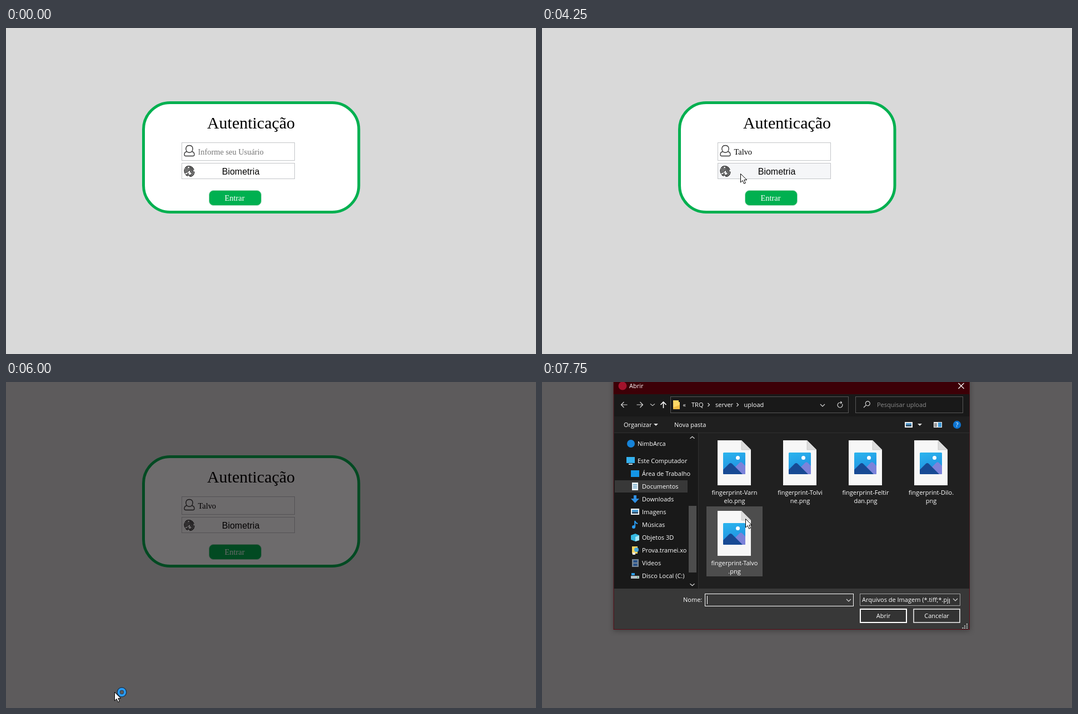
Write an HTML page that moves like this. It is 954 by 587 pixels and loops after 8000 ms.

```html
<!DOCTYPE html>
<html lang="pt-BR">
<head>
<meta charset="utf-8">
<title>Autenticação</title>
<style>
html, body { margin: 0; width: 100%; height: 100%; overflow: hidden; background: #d9d9d9; }
svg { display: block; width: 954px; height: 587px; }
.serif { font: 14.4px "Liberation Serif", serif; }
.arial { font: 16px "Liberation Sans", sans-serif; }
.lato { font: 11.6px Lato, sans-serif; }
.ui { font: 11px "Open Sans", sans-serif; fill: #fff; }
.mid { text-anchor: middle; }
.line { fill: none; stroke: #d6d6d6; stroke-width: 1.2; }
.drop { filter: drop-shadow(0 1px 2px rgba(0, 0, 0, .5)); }
text { white-space: pre; }
</style>
</head>
<body>
<svg id="stage" viewBox="0 0 954 587" xmlns="http://www.w3.org/2000/svg"></svg>
<script>
const LOOP = 8000, STEP = 250;
const NAME = 'Talvo', EMAIL = 'talvo.bremin37@zulteia.com';

const rect = (x, y, w, h, fill, more = '') =>
  `<rect x="${x}" y="${y}" width="${w}" height="${h}" fill="${fill}" ${more}/>`;
const box = (x, y, w, h, fill, stroke, more = '') =>
  rect(x + .5, y + .5, w - 1, h - 1, fill, `stroke="${stroke}" ${more}`);
const dot = (x, y, r, fill, more = '') => `<circle cx="${x}" cy="${y}" r="${r}" fill="${fill}" ${more}/>`;
const path = (d, more = 'class="line"') => `<path d="${d}" ${more}/>`;
const text = (x, y, str, cls = 'ui', more = '') => `<text x="${x}" y="${y}" class="${cls}" ${more}>${str}</text>`;
const during = (spans, body) => `<g data-on="${spans}">${body}</g>`;
const chevron = (x, y, s = 1) => path(`M${x - 4} ${y - 2 * s}l4 ${4 * s}l4 ${-4 * s}`);
const triangle = (x, y) => path(`M${x - 4} ${y - 2}h8l-4 4z`, 'fill="#ddd"');

function fingerprint() {
  const rings = [[2.2, '9 5'], [4.5, '20 4 3 2'], [6.8, '12 2 26 3'], [9, '30 3 14 3 5 2']];
  return rings.map(([r, dash]) =>
    `<ellipse cx="330" cy="258" rx="${r * .94}" ry="${r * 1.06}" fill="none" stroke="#222" stroke-width="1.5"
      stroke-dasharray="${dash}" transform="rotate(150 330 258)"/>`).join('');
}

function loginCard() {
  return rect(247.5, 134.5, 387.5, 197, '#fff', 'rx="48" stroke="#00b050" stroke-width="5"') +
    text(441, 181, 'Autenticação', 'serif mid', 'style="font-size:30px"') +
    box(316, 206, 204, 33, '#fff', '#c3c5c8') +
    path('M325.5 222.500C322.500 218 323.500 211.500 330 211.500S337.500 218 334.500 222.500C337 223 339 224.500 339 228Q339 230.500 336.500 230.500H323.500Q321 230.500 321 228C321 224.500 323 223 325.500 222.500Q330 226 334.500 222.500',
      'fill="none" stroke="#333" stroke-width="1.3"') +
    text(345.5, 227.5, '', 'serif', 'id="user"') +
    `<rect id="caret" y="213" width="1" height="18"/>` +
    box(316, 243, 204, 29, '#fff', '#c3c5c8', 'id="biometry"') +
    fingerprint() + text(422.5, 264, 'Biometria', 'arial mid') +
    box(365, 292, 95, 28, '#00b050', '#a5d9bb', 'rx="8"') +
    text(411.5, 311, 'Entrar', 'serif mid', 'fill="#fff"');
}

function suggestions(spans, items) {
  const rows = items.map((s, i) => text(327, 268.5 + i * 34.5, s, 'lato')).join('');
  return during(spans, rect(315.500, 240, 204.500, 15 + items.length * 34.5, '#fff', 'rx="3" class="drop"') + rows);
}

function filePanel() {
  return box(-2, 331, 275, 260, '#25171e', '#6e1f3a') +
    dot(203, 357.5, 6.3, 'none', 'class="line"') +
    dot(200.8, 356, .9, '#ddd') + dot(205.2, 356, .9, '#ddd') + path('M199.5 359.5q3.500 3.500 7 0') +
    rect(222.500, 350, 1, 15, '#5c4751') +
    [238, 242.5, 247].map(x => dot(x, 358, 1, '#ddd')).join('') +
    dot(-14, 442, 55, '#e9fff6') + rect(85, 384, 15, 6, '#5b5056') +
    rect(152, 405, 64, 64, '#000') +
    text(40, 512, 'rabisc.png', 'lato mid', 'fill="#fff" style="font-size:10px"') +
    text(184, 512, 'Logo.png', 'lato mid', 'fill="#fff" style="font-size:10px"') +
    rect(0, 539, 250, 1, '#5a4550') +
    box(-5, 554, 255, 27, '#3b2630', '#6b4857', 'rx="3" id="showAll"') +
    text(105, 571.5, 'Mostrar todos os arquivos', 'lato', 'fill="#fff" text-anchor="end"');
}

function imageFile(x, y, top, bottom) {
  const icon = path('M0 0h43l17 17v64h-60z', 'fill="#f7f7f7"') +
    path('M43 0v17h17z', 'fill="#dcdcdc" stroke="#bbb" stroke-width=".6"') +
    rect(10, 22, 40, 39, 'url(#sky)', 'rx="1.500"') +
    path('M29 51L40 40Q42 38.500 44 40L50 46V59.500Q50 61 48.500 61H38z', 'fill="#7c83da"') +
    path('M10 53L21 42Q23.500 40 26 42L45 61H11.500Q10 61 10 59.500z', 'fill="#174a94"') +
    dot(36.5, 31.5, 3.5, '#fff');
  return `<g transform="translate(${x} ${y})">${icon}${text(30.5, 98, top, 'ui mid')}${text(30.5, 113, bottom, 'ui mid')}</g>`;
}

function sidebarStart() {
  const items = ['Área de Traba', 'Downloads', 'Documentos', 'Vídeos', 'Imagens', 'Jogos Salvos', 'TRQ', 'server', 'FVEL - 6º Semes', 'upload'];
  return text(172, 123, 'Acesso rápido') + items.map((s, i) => {
    const y = 142 + i * 23;
    const pin = path(`M251 ${y + 4}l3-3M252 ${y - 1}l5 5M253.500 ${y - .5}l3-3l2 2l-3 3z`, 'fill="#9db0bd" stroke="#9db0bd" stroke-width="1.3"');
    return path(`M162 ${y - 7}h8l3 3v11h-11z`, 'fill="#fff"') + path(`M170 ${y - 7}v3h3z`, 'fill="#aaa"') +
      text(180, y + 4, s) + (i < 6 ? pin : '');
  }).join('') + rect(264, 108, 14, 188, '#4d4d4d');
}

function sidebarScrolled() {
  const screen = (x, y) => rect(x, y - 6, 15, 11, '#35b1ee');
  const sheet = y => rect(162, y - 7, 11, 14, '#e9f2f7') +
    [-4, -1, 2].map(d => rect(164, y + d, 7, 1.3, '#5597bd')).join('');
  const picture = y => rect(160, y - 6, 15, 11, '#f2f2f2') + rect(162, y - 4, 11, 7, '#4a9bd4') + rect(162, y, 11, 3, '#33506a');
  const items = [
    ['Área de Trabalho', y => rect(160, y - 6, 15, 12, '#1496e6')],
    ['Documentos', sheet],
    ['Downloads', y => path(`M165 ${y - 7}h5v6h5l-7.500 8l-7.500-8h5z`, 'fill="#2f8fe3"')],
    ['Imagens', picture],
    ['Músicas', y => dot(165, y + 4, 3, '#2a9bf0') + path(`M167.200 ${y + 4}v-11q1 4 5 5`, 'fill="none" stroke="#2a9bf0" stroke-width="2"')],
    ['Objetos 3D', y => path(`M160 ${y - 4}l8-3l7 3v9l-7 2l-8-3z`, 'fill="#35b9e2"') + path(`M168 ${y - 1}l7-3v9l-7 2z`, 'fill="#a5e6f5"')],
    ['Prova.tramei.xo', y => rect(162, y - 7, 10, 13, '#f4d35e') + dot(170, y - 1, 4, '#45a4d8') + rect(163, y + 4, 5, 4, '#eee')],
    ['Vídeos', y => rect(162, y - 7, 12, 14, '#788796') + rect(164.500, y - 5, 7, 4, '#254f88') + rect(164.500, y + 1, 7, 4, '#254f88')],
    ['Disco Local (C:)', y => rect(160, y, 15, 5, '#b8c2c8') + rect(161, y - 5, 6, 4, '#2b9de8') + dot(172, y + 2.5, 1, '#3b6')]
  ];
  return dot(160, 111, 7, '#1683d8') + text(172, 115, 'NimbArca') +
    screen(152, 141) + rect(156, 147, 7, 2, '#c9d5db') + text(172, 146, 'Este Computador') +
    rect(131, 177, 131, 22, '#383838') +
    items.map(([s, icon], i) => icon(165 + i * 23) + text(180, 169 + i * 23, s)).join('') +
    rect(264, 223, 14, 120, '#4d4d4d');
}

function dialogBlanks() {
  return rect(129, 22, 640, 40, '#fff') + rect(254, 385, 35, 14, '#fff') + rect(293, 381, 268, 23, '#fff') +
    rect(572, 381, 181, 22, '#fff') + rect(572, 408, 85, 26, '#fff') + rect(668, 408, 85, 26, '#fff') +
    rect(753, 429, 16, 16, '#fff');
}

function dialogControls() {
  const grip = [[765, 436], [761, 439.5], [765, 439.5], [757.5, 443], [761, 443], [765, 443]];
  return path('M153.500 41h-11m5-5l-5 5l5 5M170.500 41h11m-5-5l5 5l-5 5') + chevron(199, 41, .8) +
    path('M218.500 47v-11m-5 5l5-5l5 5', 'fill="none" stroke="#fff" stroke-width="1.600"') +
    box(231, 26, 321, 30, '#191919', '#575757') +
    path('M236 33h10v3h2v13h-12z', 'fill="#ffd766"') + path('M236 46l12-5v8h-12z', 'fill="#f2bd45"') +
    text(253.5, 45, '«') + text(269, 45, 'TRQ') + text(312, 45, 'server') + text(363.5, 45, 'upload') +
    path('M298.500 38l3 3l-3 3M350.500 38l3 3l-3 3') + chevron(505, 42) +
    path('M540.500 39.500a4.500 4.500 0 1 1-4-2.500h3m-2-2l2 2l-2 2') +
    box(564, 26, 194, 30, '#191919', '#575757') +
    path('M579 46l4-4m0-1a4 4 0 1 1 2 1.500a4 4 0 0 1-2-1.500') +
    text(603, 45, 'Pesquisar upload', 'ui', 'style="fill:#8b8b8b"') +
    text(147, 81, 'Organizar') + triangle(205, 77) + text(238, 81, 'Nova pasta') +
    rect(653, 72, 14, 10, '#eee') + rect(655, 74, 10, 5, '#4c97cc') + rect(655, 77, 10, 3, '#31516a') + triangle(680, 77) +
    text(254, 396, 'Nome:') + box(293, 381, 268, 23, '#383838', '#fff') + rect(297, 385, 1, 15, '#fff') + chevron(552, 393) +
    box(572, 381, 181, 22, '#333', '#a0a0a0') +
    `<g clip-path="url(#typeClip)">${text(576, 396, 'Arquivos de Imagem (*.tiff;*.pjp;*.jpg)')}</g>` + chevron(744, 392) +
    rect(573, 409, 83, 24, '#333', 'stroke="#fff" stroke-width="2"') + text(614.5, 425, 'Abrir', 'ui mid') +
    rect(669, 409, 83, 24, '#333', 'stroke="#e8e8e8" stroke-width="1.600"') + text(710.5, 425, 'Cancelar', 'ui mid') +
    grip.map(([x, y]) => rect(x - 1, y - 1, 2, 2, '#ccc')).join('');
}

function openDialog() {
  const files = [['Varn', 'elo.png'], ['Tolvi', 'ne.png'], ['Feltir', 'dan.png'], ['Dilo.', 'png'], [NAME, '.png']];
  return rect(129, -4, 640.500, 449.500, '#383838', 'stroke="#5a0d17" style="filter:drop-shadow(0 2px 5px rgba(0,0,0,.3))"') +
    rect(129, 0, 640, 22, '#3d0007') + dot(145, 7, 7.5, '#a3132c') + text(157, 11, 'Abrir') +
    path('M749.500 2l10 10m0-10l-10 10', 'stroke="#fff" stroke-width="1.200"') +
    rect(129.500, 22, 640, 40, '#191919') + rect(129.500, 62, 640, 30, '#1f1f1f') +
    rect(129.500, 91, 152, 281, '#191919') + rect(281, 91, 488.500, 281, '#202020') +
    rect(129.500, 91, 640, 1, '#303030') + rect(281, 92, 1, 280, '#303030') +
    rect(705, 72, 15, 10, '#eee') + rect(706, 74, 5, 7, '#999') + rect(713, 73, 6, 8, '#3b97d6') +
    dot(747, 77, 7.2, '#0d74d1') + text(747, 81, '?', 'ui mid', 'font-weight="bold"') +
    chevron(270.5, 100, -.9) + chevron(270.5, 365, .9) +
    `<g clip-path="url(#sideClip)">${during('6250-6500', sidebarStart())}${during('6500-8000', sidebarScrolled())}</g>` +
    during('7250-8000', rect(296, 224, 101, 126, '#4d4d4d')) +
    files.map(([a, b], i) => imageFile(316 + i % 4 * 118, 105 + Math.floor(i / 4) * 127, 'fingerprint-' + a, b)).join('') +
    during('6250-6500', dialogBlanks()) + during('6500-8000', dialogControls());
}

const pointers = {
  beam: path('M-3-8q3 0 3 2q0-2 3-2M0-6v12M-3 8q3 0 3-2q0 2 3 2', 'fill="none" stroke="#222"'),
  arrow: path('M.5.5V16l3.600-3.400l2.500 5.700l2.700-1.200l-2.500-5.500h5z', 'fill="#fff" stroke="#000"'),
  busy: dot(13.5, .5, 6, 'none', 'stroke="#16334f" stroke-width="6"') + dot(13.5, .5, 5.7, 'none', 'stroke="#2a9bf2" stroke-width="4"')
};

const stage = document.getElementById('stage');
stage.innerHTML = `<defs>
  <linearGradient id="sky" x1="0" y1="0" x2=".3" y2="1"><stop stop-color="#2bb5ee"/><stop offset="1" stop-color="#1f8fe0"/></linearGradient>
  <clipPath id="sideClip"><rect x="129" y="91" width="152" height="281"/></clipPath>
  <clipPath id="typeClip"><rect x="574" y="383" width="160" height="18"/></clipPath></defs>` +
  rect(0, 0, 954, 587, '#d9d9d9') + loginCard() +
  suggestions('750-1500', [NAME, 'admin', 'teste', 'usuario', 'Feltirdan', 'Dilo']) +
  suggestions('1500-2500', [NAME, NAME, 'talvo', EMAIL, 'Tolvine', 'teste']) +
  suggestions('2500-3500', [NAME, NAME, 'talvo', EMAIL]) +
  during('4500-8000', rect(0, 0, 954, 587, '#050002', 'opacity=".58"')) +
  during('4500-6000', filePanel()) + during('6250-8000', openDialog()) +
  `<g id="pointer">${Object.entries(pointers).map(([k, p]) => `<g id="${k}">${p}</g>`).join('')}</g>`;

const $ = id => document.getElementById(id);
const show = (el, on) => el.setAttribute('visibility', on ? 'inherit' : 'hidden');
const timed = [...document.querySelectorAll('[data-on]')].map(el => [el, ...el.dataset.on.split('-').map(Number)]);

// time, x, y, kind
const route = [
  [0, 0, 0, ''], [250, 390, 205, 'beam'], [500, 420, 226, 'beam'], [1500, 0, 0, ''],
  [3250, 256, 292, 'arrow'], [3500, 264, 294, 'arrow'], [3750, 292, 287, 'arrow'], [4000, 332, 273, 'arrow'],
  [4250, 357, 262, 'arrow'], [4500, 403, 333, 'arrow'], [4750, 376, 382, 'arrow'], [5000, 312, 451, 'arrow'],
  [5250, 238, 522, 'arrow'], [5500, 195, 558, 'arrow'], [6000, 195, 558, 'busy'], [6250, 331, 430, 'arrow'],
  [7000, 337, 398, 'arrow'], [7250, 346, 340, 'arrow'], [7500, 359, 285, 'arrow'], [7750, 366, 246, 'arrow']
];
const keyTimes = [1500, 1750, 2000, 2500, 2750];

function render(t) {
  timed.forEach(([el, from, to]) => show(el, t >= from && t < to));

  const typed = NAME.slice(0, keyTimes.filter(k => t >= k).length);
  const user = $('user');
  user.textContent = typed || 'Informe seu Usuário';
  user.setAttribute('fill', typed ? '#000' : '#757575');
  $('caret').setAttribute('x', typed ? 346 + user.getComputedTextLength() : 345);
  show($('caret'), t >= 500 && t < 3500 && t !== 1000 && t !== 1250);
  $('biometry').setAttribute('fill', t >= 4000 && t < 4500 ? '#f5f6f8' : '#fff');
  $('showAll').setAttribute('fill', t >= 5500 ? '#563745' : '#3b2630');

  const [, x, y, kind] = route.filter(r => t >= r[0]).pop();
  $('pointer').setAttribute('transform', `translate(${x} ${y})`);
  show($('beam'), kind === 'beam');
  show($('arrow'), kind === 'arrow' || kind === 'busy');
  show($('busy'), kind === 'busy');
}

function tick() {
  render(Math.floor(performance.now() % LOOP / STEP) * STEP);
  requestAnimationFrame(tick);
}
tick();
</script>
</body>
</html>
```
